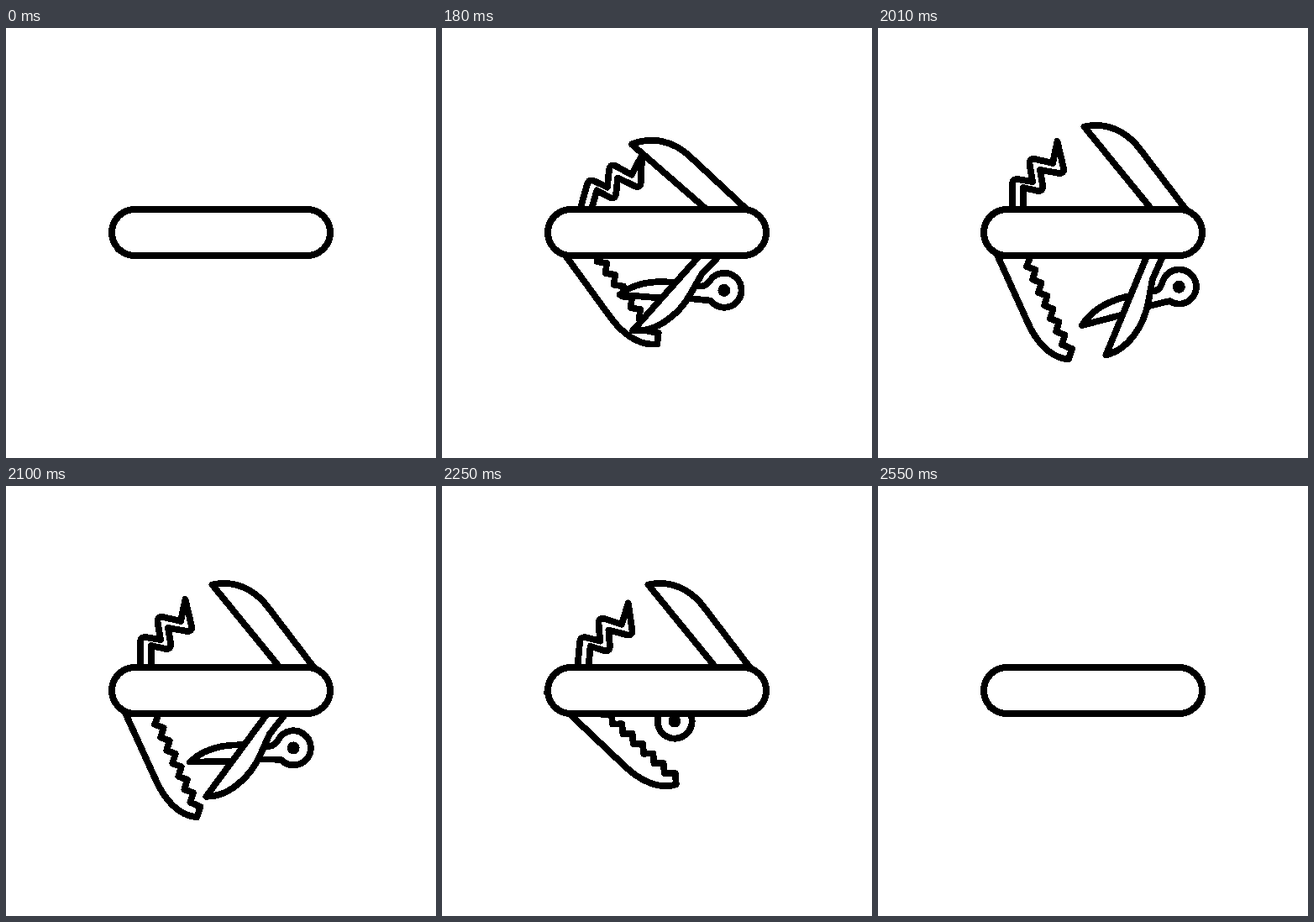
These frames come from a looping animation (512x512 px, 3150 ms). An HTML page:

```html
<!DOCTYPE html>
<html lang="en">
<head>
<meta charset="utf-8">
<title>Pocket knife</title>
<style>
  html, body { margin: 0; width: 100%; height: 100%; overflow: hidden; background: #fff; }
  svg { display: block; width: 100%; height: 100%; shape-rendering: crispEdges; }
</style>
</head>
<body>
<svg viewBox="0 0 512 512" fill="#fff" stroke="#000" stroke-width="7.8" stroke-linejoin="round" stroke-linecap="round">
  <clipPath id="upper"><rect width="512" height="243"/></clipPath>
  <clipPath id="lower"><rect y="243" width="512" height="269"/></clipPath>
  <g clip-path="url(#upper)">
    <path id="corkscrew" d="M160 243V187Q160 180 166 180L184 183L180.5 162Q180 155 187 156L208 161L213.5 135L221 167Q222 173 216 173L193 169L196 187Q197 195 190 194L173 190V243"/>
    <path id="blade" d="M339.5 232.6L245.5 117.5C270 112 295 121 312.5 145L378 231"/>
  </g>
  <g clip-path="url(#lower)">
    <path id="saw"/>
    <g id="scissors">
      <path d="M244 355C255 337 275 325 302 319L331 313Q337 311 339.5 302A20.5 20.5 0 1 1 348 325L320 332L290 342.5Z"/>
      <circle cx="359" cy="308" r="7.5" fill="#000" stroke="none"/>
      <path d="M328 253L273 390C298 384 318 356 323 325L327.5 299L338 275L349 250"/>
    </g>
  </g>
  <rect x="126" y="216" width="260" height="55" rx="27.5" stroke-width="8"/>
</svg>
<script>
const LOOP = 3150, STEP = 30;
const OPEN_START = 20, OPEN_END = 300;

// Folded angle, pivot, and when each tool starts folding and for how long
const tools = [
  { id: "scissors",  angle: 108, x: 335,   y: 244, start: 1987, span: 308 },
  { id: "saw",       angle: -64, x: 153,   y: 243, start: 2085, span: 280 },
  { id: "corkscrew", angle: 85,  x: 166.5, y: 233, start: 2185, span: 271 },
  { id: "blade",     angle: -53, x: 359,   y: 243, start: 2285, span: 253 }
];
for (const tool of tools) tool.el = document.getElementById(tool.id);

function sawPath() {
  let d = "M126 235L178 350C188 373 205 393 227 394.5L231 382";
  for (let i = 6; i >= 0; i--) {
    const x = 177 + 7 * i, y = 284 + 15.5 * i;
    if (i < 6) d += `L${x + 10.5} ${y + 4}`;
    d += `L${x} ${y}`;
  }
  return d + "L188 255";
}

const clamp = v => Math.min(1, Math.max(0, v));

function folded(tool, t) {
  if (t < 1000) return (1 - clamp((t - OPEN_START) / (OPEN_END - OPEN_START))) ** 2;
  return clamp((t - tool.start) / tool.span) ** 2;
}

function draw(time) {
  const t = Math.floor((time % LOOP) / STEP) * STEP;
  for (const tool of tools) {
    const turn = tool.angle * folded(tool, t);
    tool.el.setAttribute("transform", `rotate(${turn} ${tool.x} ${tool.y})`);
  }
}

document.getElementById("saw").setAttribute("d", sawPath());
const begin = performance.now();
function tick() {
  draw(performance.now() - begin);
  requestAnimationFrame(tick);
}
tick();
</script>
</body>
</html>
```
